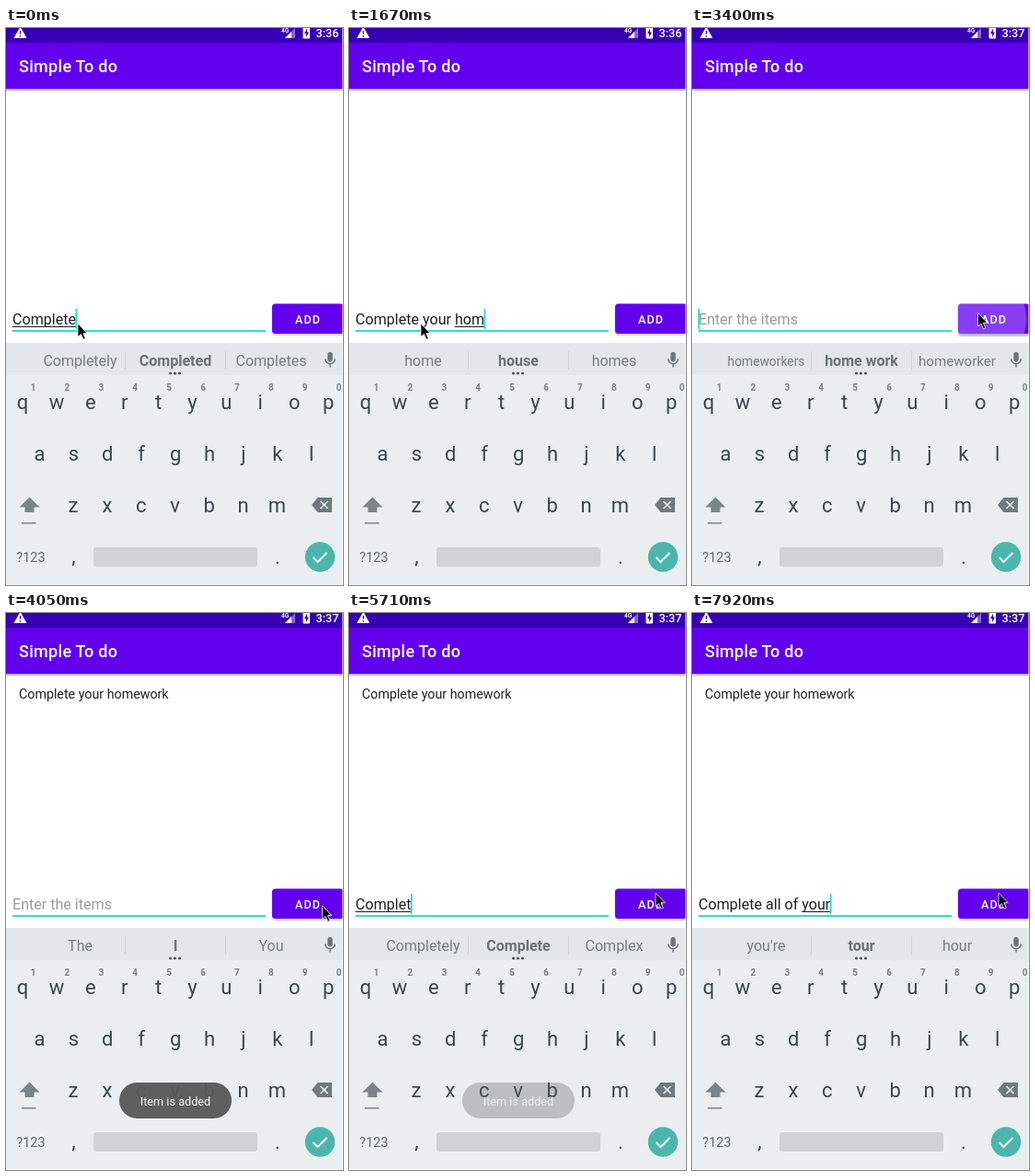
Animation, 366 px wide and 605 px high, one loop 8 s. Source, as an HTML page:

```html
<!DOCTYPE html>
<html lang="en">
<head>
<meta charset="utf-8">
<title>Simple To do</title>
<style>
  html, body { margin: 0; width: 100%; height: 100%; overflow: hidden; background: #fefefe; }
  svg { display: block; width: 366px; height: 605px; font-family: Roboto, sans-serif; }
  text { white-space: pre; }
  .mid { text-anchor: middle; }
  .key { font-size: 22px; fill: #37474f; }
  .num { font-size: 10px; font-weight: 700; fill: #7a8286; }
  .hint { font-size: 16px; fill: #757d81; }
  .bold { font-weight: 700; fill: #697277; }
  .field { font-size: 16.08px; fill: #202020; }
</style>
</head>
<body>
<svg viewBox="0 0 366 605">
  <defs>
    <linearGradient id="fall" x2="0" y2="1">
      <stop offset="0" stop-color="#000" stop-opacity=".35"/>
      <stop offset="1" stop-color="#000" stop-opacity="0"/>
    </linearGradient>
    <filter id="blur" x="-20%" y="-40%" width="140%" height="190%"><feGaussianBlur stdDeviation="1.2"/></filter>
    <clipPath id="face"><rect x="289" y="299.500" width="78" height="32.500" rx="3.500"/></clipPath>
  </defs>
  <rect width="366" height="605" fill="#fefefe"/>

  <!-- bars -->
  <rect y="66" width="366" height="3.500" fill="url(#fall)"/>
  <rect y="16" width="366" height="50" fill="#6200ee"/>
  <rect width="366" height="16" fill="#3700b3"/>
  <path d="M15.500-1.500L22.500 11H8.500Z" fill="#fff"/>
  <path d="M14.900 3h1.300v3.800h-1.300zM14.900 8h1.300v1.400h-1.300z" fill="#3700b3"/>
  <text x="299" y="4.500" font-size="6.500" font-weight="700" fill="#fff">4G</text>
  <path d="M314 0V11H303Z" fill="#fff" opacity=".4"/>
  <path d="M310 4V11H303Z" fill="#fff"/>
  <rect x="322.500" y="-1" width="7.500" height="12.500" rx="1" fill="#fff"/>
  <path d="M327 .5L324 6h2v4l3-5.500h-2z" fill="#3700b3"/>
  <text id="clock" x="336.500" y="10" font-size="12.700" font-weight="500" fill="#fff"></text>
  <text x="14" y="48" font-size="18" font-weight="500" letter-spacing=".3" fill="#fff">Simple To do</text>

  <!-- list and field -->
  <text id="item" x="14" y="93" font-size="14.250" fill="#202020">Complete your homework</text>
  <rect x="7" y="328.200" width="275" height="1.700" fill="#14d6c4"/>
  <text id="empty" x="7" y="322" class="field" style="fill:#9a9a9a">Enter the items</text>
  <text id="typed" x="7" y="322" class="field"></text>
  <rect id="under" y="324" height="1" fill="#202020"/>
  <rect id="caret" y="305" width="1.600" height="22" fill="#14d6c4"/>

  <!-- button -->
  <rect id="shade" x="289" y="300.500" width="78" height="33" rx="3.500" filter="url(#blur)"/>
  <g clip-path="url(#face)">
    <rect x="289" y="299" width="78" height="33" fill="#6200ee"/>
    <circle id="ripple" cx="312" cy="316" fill="#fff"/>
  </g>
  <text x="314" y="320.700" font-size="12.500" font-weight="500" letter-spacing="1.100" fill="#fff">ADD</text>

  <!-- keyboard -->
  <rect y="342" width="366" height="263" fill="#eaeef0"/>
  <rect y="342" width="366" height="35" fill="#e3e7e9"/>
  <path d="M129.500 351v20M238.500 351v20" stroke="#cfd4d6"/>
  <g id="strip"></g>
  <path d="M178.500 375h.01M183.500 375h.01M188.500 375h.01" stroke="#4a5459" stroke-width="3" stroke-linecap="round"/>
  <rect x="349.300" y="352" width="5.400" height="10.500" rx="2.700" fill="#6c767a"/>
  <path d="M346.700 359.500a5.300 5.300 0 0 0 10.600 0M352 365v3.500" fill="none" stroke="#6c767a" stroke-width="1.500"/>
  <g id="keys"></g>
  <path d="M25.500 509.500L36.500 520.500H30.500V526H20.500V520.500H14.500Z" fill="#79848a"/>
  <rect x="17" y="537" width="15.500" height="1.500" fill="#79848a"/>
  <path d="M332 518L338.500 510H354V526H338.500Z" fill="#6f7a7f"/>
  <path d="M341.500 514l8 8m0-8l-8 8" stroke="#eaeef0" stroke-width="1.700"/>
  <text x="27" y="580" class="mid" font-size="14.500" fill="#5f6b71">?123</text>
  <rect x="95" y="564" width="178" height="21" rx="3" fill="#cfd3d5"/>
  <circle cx="341" cy="574.500" r="16.200" fill="#4db6ac"/>
  <path d="M333.500 575l5 5 10-10" fill="none" stroke="#fff" stroke-width="1.900"/>

  <g id="toast">
    <rect x="123" y="510" width="122" height="39" rx="19.500" fill="#585858" fill-opacity=".95"/>
    <text x="184" y="534.700" class="mid" font-size="12.700" fill="#f4f4f4">Item is added</text>
  </g>
  <path d="M365.500 0V604.500H0" fill="none" stroke="#fff" opacity=".6"/>
  <path id="mouse" d="M0 0V14.500L3.400 11.500 6 17.300 8.300 16.300 5.800 10.700H10.200Z" fill="#000" stroke="#fff" stroke-width=".8"/>
</svg>
<script>
const LOOP = 8000;
const $ = id => document.getElementById(id);
const pen = document.createElement('canvas').getContext('2d');

function width(text, size, weight = 400) {
  pen.font = `${weight} ${size}px Roboto, sans-serif`;
  return pen.measureText(text).width;
}

function addText(parent, text, x, y, cls) {
  const el = document.createElementNS('http://www.w3.org/2000/svg', 'text');
  el.setAttribute('x', x);
  el.setAttribute('y', y);
  el.setAttribute('class', 'mid ' + cls);
  el.textContent = text;
  parent.append(el);
  return el;
}

const PITCH = 36.9;
const rows = [['qwertyuiop', 18, 414], ['asdfghjkl', 36.5, 470], ['zxcvbnm', 73, 526]];
for (const [chars, x, y] of rows)
  [...chars].forEach((c, i) => addText($('keys'), c, x + i * PITCH, y, 'key'));
[...'1234567890'].forEach((c, i) => addText($('keys'), c, 29.5 + i * PITCH, 394, 'num'));
addText($('keys'), ',', 73.5, 581, 'key');
addText($('keys'), '.', 295, 582, 'key');

const slots = [80.5, 184, 288].map((x, i) => addText($('strip'), '', x, 367, i === 1 ? 'hint bold' : 'hint'));

// "|" marks the start of the underlined word
const typing = [
  [0, '|Complete'], [90, 'Complete '], [430, 'Complete |y'], [580, 'Complete |yo'],
  [700, 'Complete |you'], [840, 'Complete your'], [960, 'Complete |your'], [1140, 'Complete your '],
  [1370, 'Complete your |h'], [1500, 'Complete your |ho'], [1580, 'Complete your |hom'],
  [1710, 'Complete your |home'], [1850, 'Complete your |homew'], [2030, 'Complete your |homewo'],
  [2200, 'Complete your |homewor'], [2370, 'Complete your |homework'], [3380, ''],
  [4770, '|C'], [4940, '|Co'], [5120, '|Com'], [5420, '|Comp'], [5590, '|Compl'],
  [5660, '|Comple'], [5700, '|Complet'], [5750, '|Complete'], [5800, 'Complete '],
  [6540, 'Complete |a'], [6620, 'Complete |al'], [6700, 'Complete |all'], [6820, 'Complete all '],
  [6980, 'Complete all |o'], [7100, 'Complete all |of'], [7160, 'Complete all of '],
  [7460, 'Complete all of |y'], [7600, 'Complete all of |yo'], [7740, 'Complete all of |you'],
  [7860, 'Complete all of |your']
];

const hints = [
  [0, 'Completely,Completed,Completes'], [320, 'of,I,to'], [520, 'you,your,yes'],
  [640, 'you,your,young'], [780, "your,you're,young"], [1300, 'work,day,own'],
  [1440, 'home,have,his'], [1650, 'home,house,homes'], [1780, 'homes,home,homey'],
  [2110, 'homeowner,homework,homeward'], [2430, 'homeworkers,homework,homeworker'],
  [2490, 'homeworkers,home work,homeworker'], [3520, 'The,I,You'], [4830, 'Can,C,Come'],
  [5000, 'Could,Come,Cool'], [5200, 'Company,Come,Common'], [5480, 'Company,Come,Computer'],
  [5630, 'Completely,Complete,Complex'], [5770, 'Completely,Completed,Completes'],
  [6160, 'your,the,and'], [6420, 'of,I,to'], [6580, 'and,a,all'], [6760, 'also,all,always'],
  [7040, 'on,of,or'], [7130, 'off,of,often'], [7400, 'the,your,my'], [7530, 'you,your,yes'],
  [7670, 'you,your,young'], [7800, "your,you're,young"], [7920, "you're,tour,hour"]
];

const path = [
  [0, 78, 321], [2730, 78, 321], [2840, 125, 368], [2910, 185, 387], [3000, 270, 340],
  [3080, 329, 270], [3170, 310.5, 309.5], [3700, 310.5, 309.5], [4140, 352, 320],
  [4180, 352, 320], [4300, 333, 304], [LOOP, 333, 304]
];

const at = (steps, t) => steps.findLast(s => s[0] <= t)[1];
const ramp = (t, a, b) => Math.min(1, Math.max(0, (t - a) / (b - a)));
const set = (id, attrs) => { for (const k in attrs) $(id).setAttribute(k, attrs[k]); };

function drawField(t) {
  const mark = at(typing, t);
  const text = mark.replace('|', '');
  const cut = mark.indexOf('|');
  const edge = part => 7 + width(part, 16.08);
  const end = edge(text);
  const start = cut < 0 ? end : edge(text.slice(0, cut));
  $('typed').textContent = text;
  set('empty', { opacity: text ? 0 : 1 });
  set('under', { x: start, width: end - start });
  set('caret', { x: end - 0.4, opacity: t >= 3860 && t < 4300 ? 0 : 1 });
}

function drawStrip(t) {
  at(hints, t).split(',').forEach((word, i) => {
    slots[i].textContent = word;
    const fit = Math.min(1, 84 / width(word, 16, i === 1 ? 700 : 400));
    slots[i].style.fontSize = 16 * fit + 'px';
  });
}

function drawButton(t) {
  const press = ramp(t, 3340, 3380) * (1 - ramp(t, 3560, 3760));
  set('ripple', { r: 20 + 31 * ramp(t, 3340, 3400) + 30 * ramp(t, 3400, 3500), opacity: 0.24 * press });
  set('shade', { opacity: 0.25 + 0.07 * press, y: 300.5 + press });
}

function drawMouse(t) {
  const i = path.findIndex(p => p[0] > t);
  const [a, x, y] = path[i - 1];
  const [b, x2, y2] = path[i];
  const k = ramp(t, a, b);
  set('mouse', { transform: `translate(${x + (x2 - x) * k} ${y + (y2 - y) * k})` });
}

function draw(t) {
  $('clock').textContent = t < 2290 ? '3:36' : '3:37';
  set('item', { opacity: t < 3440 ? 0 : 1 });
  set('toast', { opacity: ramp(t, 3500, 3800) * (1 - ramp(t, 5530, 5800)) });
  drawField(t);
  drawStrip(t);
  drawButton(t);
  drawMouse(t);
}

const t0 = performance.now();
function tick() {
  draw((performance.now() - t0) % LOOP);
  requestAnimationFrame(tick);
}
tick();
</script>
</body>
</html>
```
